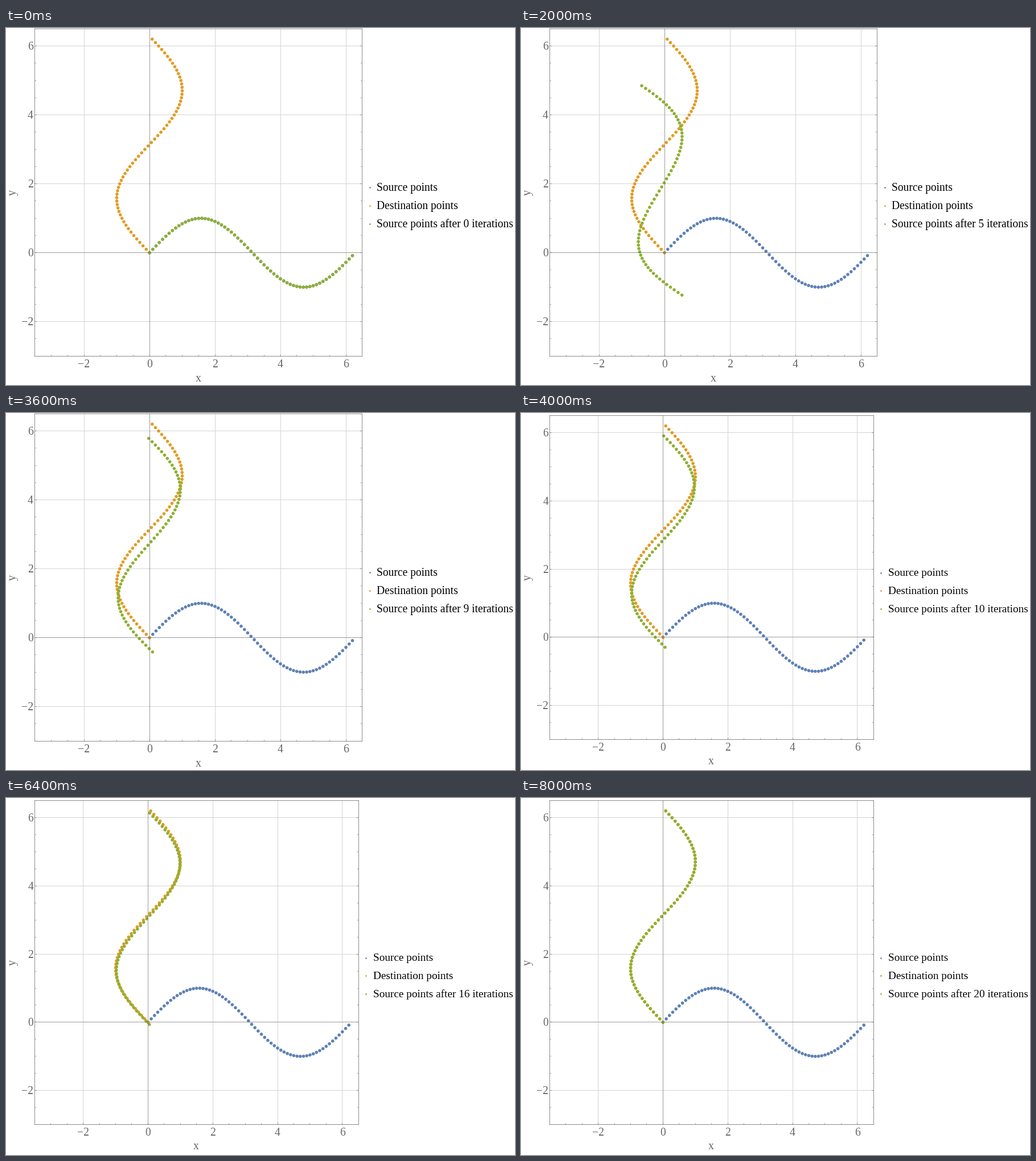
A matplotlib script that plays this animation: 894x627 px, repeating every 8400 ms.

```python
import numpy as np
import matplotlib.pyplot as plt
from matplotlib.animation import FuncAnimation

W, H, DPI = 894, 627, 64
PX = 72 / DPI
STEPS = 21
BLUE, ORANGE, GREEN = "#5e81b5", "#e19c24", "#8fb032"
GRAY = "#666666"

plt.rcParams["font.family"] = "Liberation Serif"

t = np.arange(63) / 10
src = np.column_stack([t, np.sin(t)])
dst = np.column_stack([-np.sin(t), t])


def icp_step(pts):
    """Match each point to its nearest target, then move rigidly."""
    gap = ((pts[:, None] - dst[None]) ** 2).sum(axis=2)
    near = dst[gap.argmin(axis=1)]
    mp, mq = pts.mean(axis=0), near.mean(axis=0)
    h = (pts - mp).T @ (near - mq)
    angle = 0.0
    if h.any():
        if np.linalg.det(h) < 0:  # reflection: flip its second row
            angle = -np.arctan2(h[0, 1] + h[1, 0], h[0, 0] - h[1, 1])
        else:
            angle = np.arctan2(h[0, 1] - h[1, 0], h[0, 0] + h[1, 1])
    c, s = np.cos(angle), np.sin(angle)
    return (pts - mp) @ np.array([[c, s], [-s, c]]) + mq


poses = [src]
for _ in range(STEPS - 1):
    poses.append(icp_step(poses[-1]))


class Layout:
    """Pixel geometry of the plot and its legend."""

    def __init__(self, x0, y0, ux, uy, size, xbase, label, mark, text, rows):
        self.x0, self.y0, self.ux, self.uy = x0, y0, ux, uy
        self.size, self.xbase, self.label = size, xbase, label
        self.mark, self.text, self.rows = mark, text, rows

    def x(self, v):
        return self.x0 + self.ux * v

    def y(self, v):
        return self.y0 - self.uy * v


NARROW = Layout(252, 394.7, 57.5, 60.5, 19.52, 596.3, (337.5, 621),
                638.7, 650.8, (286, 317.8, 349.6))
WIDE = Layout(249.4, 393.9, 56.9, 59.87, 19.3, 592.8, (334.3, 617.2),
              631.6, 644.6, (286.3, 317.8, 349.5))

fig = plt.figure(figsize=(W / DPI, H / DPI), dpi=DPI, facecolor="white")
ax = fig.add_axes([0, 0, 1, 1])


def line(x1, y1, x2, y2, color, z, alpha=1):
    """One-pixel line through the middle of its pixels."""
    xs, ys = np.floor([x1, x2]) + 0.5, np.floor([y1, y2]) + 0.5
    ax.plot(xs, ys, color=color, lw=PX, alpha=alpha, zorder=z,
            snap=False, solid_capstyle="projecting")


def dots(x, y, d, color, z):
    ax.scatter(x, y, s=np.full(len(x), (d * PX) ** 2), color=color,
               linewidths=0, zorder=z)


def label(x, y, s, size, color=GRAY, ha="center", **kw):
    ax.text(x, y, s, fontsize=size * PX, color=color, ha=ha, va="baseline",
            **kw)


def draw_plot(g):
    left, right, top, bottom = g.x(-3.5), g.x(6.5), g.y(6.5), g.y(-3)
    for v in (-2, 0, 2, 4, 6):
        x, y = g.x(v), g.y(v)
        name = str(v).replace("-", "\u2212")
        if v:
            line(x, top, x, bottom, "#d4d4d4", 1)
            line(left, y, right, y, "#d4d4d4", 1)
        label(x, g.xbase, name, g.size * 1.02)
        label(48, y + 6.4, name, g.size * 1.02, ha="right")

    line(g.x0, top, g.x0, bottom, GRAY, 6, 0.65)
    line(left, g.y0, right, g.y0, GRAY, 6, 0.65)
    for x in (left, right):
        line(x, top, x, bottom, GRAY, 7, 0.75)
    for y in (top, bottom):
        line(left, y, right, y, GRAY, 7, 0.75)

    for v in np.arange(-3, 6.5, 0.5):
        n = 3 if v % 2 == 0 else 2
        x, y = g.x(v), g.y(v)
        line(x, bottom - 1, x, bottom - n, GRAY, 7, 0.6)
        if v > -3:
            line(left + 1, y, left + n, y, GRAY, 7, 0.6)
            line(right - 1, y, right - n, y, GRAY, 7, 0.6)

    label(*g.label, "x", g.size * 1.03)
    label(17, 288.8, "y", g.size * 1.03, rotation=90,
          rotation_mode="anchor")


def draw(i):
    g = NARROW if i < 10 else WIDE
    ax.clear()
    ax.set_xlim(0, W)
    ax.set_ylim(H, 0)
    ax.axis("off")
    draw_plot(g)

    for z, (pts, color) in enumerate(
            [(src, BLUE), (dst, ORANGE), (poses[i], GREEN)], 3):
        dots(g.x(pts[:, 0]), g.y(pts[:, 1]), 5.6, color, z)

    # Legend marks lose their colour while the series is fully covered.
    marks = ["#808080" if i == 0 else BLUE,
             GREEN if i == STEPS - 1 else ORANGE, GREEN]
    names = ["Source points", "Destination points",
             f"Source points after {i} iterations"]
    for y, color, name in zip(g.rows, marks, names):
        dots([g.mark], [y - 5.8], 2.8, color, 5)
        label(g.text, y, name, g.size, "black", ha="left")
    return []


anim = FuncAnimation(fig, draw, frames=STEPS, init_func=lambda: draw(0),
                     interval=400, repeat=True, repeat_delay=0, blit=False)
plt.show()
```
